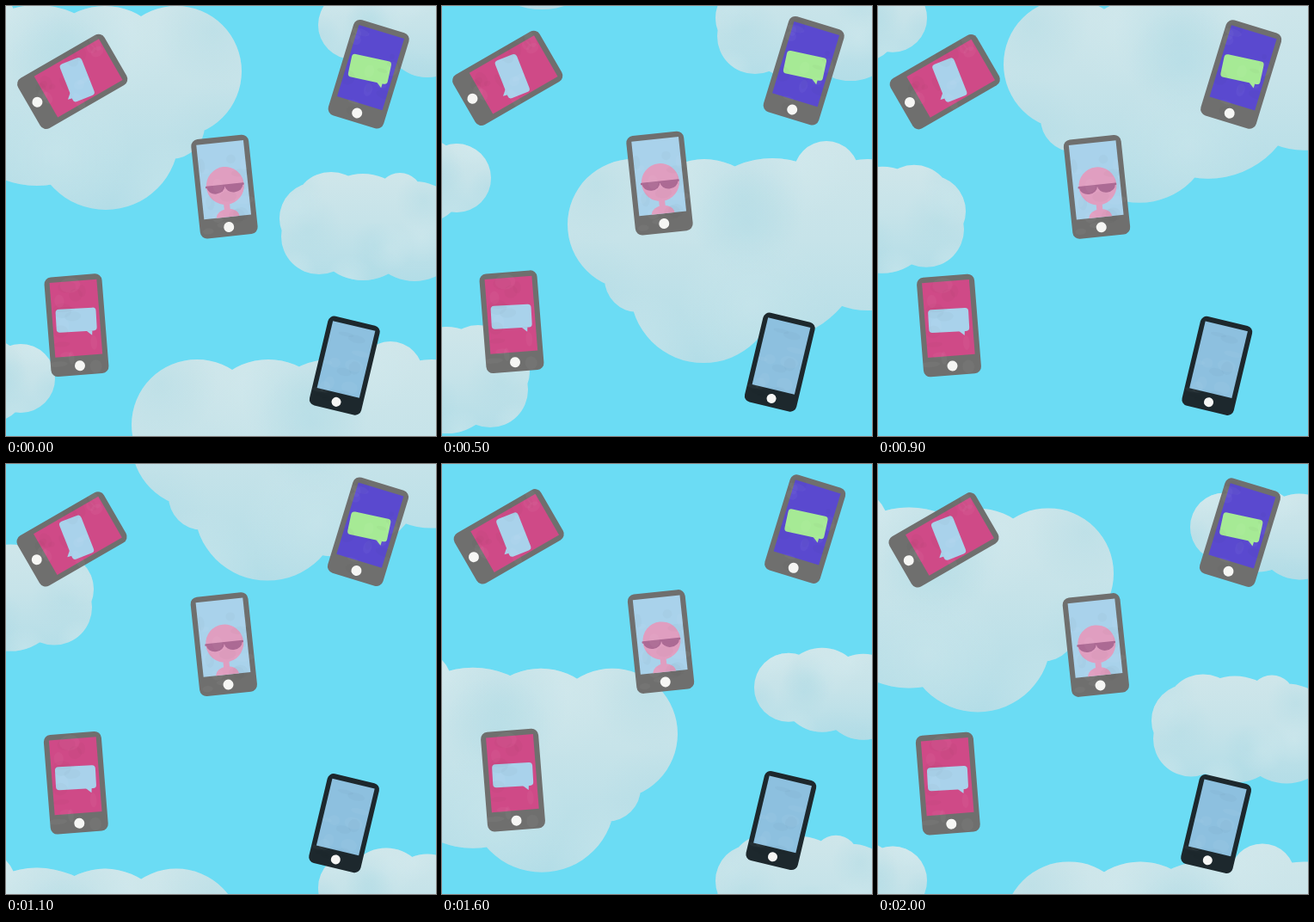
Animation, 500 px wide and 500 px high, one loop 2100 ms. Source, as an HTML page with a canvas:

```html
<!DOCTYPE html>
<html lang="en">
<head>
<meta charset="utf-8">
<title>Phones in the sky</title>
<style>
html, body { margin: 0; width: 100%; height: 100%; overflow: hidden; background: #6bdcf4; }
canvas { display: block; }
</style>
</head>
<body>
<canvas id="stage" width="500" height="500"></canvas>
<script>
const ctx = document.getElementById('stage').getContext('2d');
const STEP = 100, STEPS = 21;
const RISE = 46.58, PERIOD = 983, MIRROR_DROP = 411;
const TURN = 2 * Math.PI;

// Seeded random numbers: random(lo, hi)
function seeded(seed) {
  return (lo, hi) => {
    seed = (seed * 16807) % 2147483647;
    return lo + (hi - lo) * seed / 2147483647;
  };
}

// Each cloud is a union of a few circles: x, y, radius
const big = makeCloud([
  [222, 76, 76], [305, 80, 80], [384, 104, 105], [447, 17, 38],
  [495, 88, 88], [228, 139, 39], [304, 152, 85]
]);
const medium = makeCloud([
  [360, 247, 42], [378, 237, 44], [364, 268, 44],
  [415, 257, 62], [475, 262, 58], [458, 220, 26]
]);
const small = makeCloud([[403, 22, 40], [442, 25, 49], [490, 33, 50]]);

function makeCloud(circles) {
  const path = new Path2D();
  for (const [x, y, r] of circles) {
    path.moveTo(x + r, y);
    path.arc(x, y, r, 0, TURN);
  }
  const left = Math.min(...circles.map(([x, , r]) => x - r));
  const top = Math.min(...circles.map(([, y, r]) => y - r));
  const bottom = Math.max(...circles.map(([, y, r]) => y + r));
  const base = ctx.createLinearGradient(0, top, 0, bottom);
  base.addColorStop(0, '#cfe6ea');
  base.addColorStop(0.45, '#c6e3e9');
  base.addColorStop(1, '#b3dde7');

  // Soft light and dark patches, as in a wash of watercolour
  const random = seeded(circles.length * 1000 + 7);
  const fills = [base];
  for (let i = 0; i < 10; i++) {
    const x = random(left, 500), y = random(top, bottom), r = random(0.2, 0.35) * (bottom - top);
    const rgb = i % 2 ? '211,234,238' : '176,219,229';
    const patch = ctx.createRadialGradient(x, y, 0, x, y, r);
    patch.addColorStop(0, `rgba(${rgb},.45)`);
    patch.addColorStop(1, `rgba(${rgb},0)`);
    fills.push(patch);
  }
  return { path, fills };
}

function drawCloud(cloud, y, flip) {
  ctx.save();
  ctx.translate(flip ? 420 : 0, y);
  if (flip) ctx.scale(-1, 1);
  for (const fill of cloud.fills) {
    ctx.fillStyle = fill;
    ctx.fill(cloud.path);
  }
  ctx.restore();
}

// The group of clouds comes twice, the second time mirrored and lower
function drawSky(n) {
  ctx.fillStyle = '#6bdcf4';
  ctx.fillRect(0, 0, 500, 500);
  for (const wrap of [0, PERIOD]) {
    for (const side of [0, 1]) {
      const y = wrap + side * MIRROR_DROP - RISE * n;
      drawCloud(big, y, !side);
      drawCloud(medium, y, side);
      drawCloud(small, y, side);
    }
  }
}

const PINK = '#cf4a87', BLUE = '#a9d2eb';
const phones = [
  { x: 77, y: 86, turn: 60, screen: PINK, bubble: BLUE },
  { x: 421.5, y: 77.3, turn: 17, screen: '#5a49cf', bubble: '#a6ea95' },
  { x: 253.8, y: 208.2, turn: -6, screen: BLUE, face: true },
  { x: 81.8, y: 369.3, turn: -4.5, screen: PINK, bubble: BLUE },
  { x: 393.6, y: 416.2, turn: 13.4, size: 0.92, screen: '#8dc0df', body: '#1d282d' }
];

function box(x, y, w, h, r, color) {
  ctx.fillStyle = color;
  ctx.beginPath();
  ctx.roundRect(x, y, w, h, r);
  ctx.fill();
}

function disc(x, y, rx, ry, color, sweep = TURN) {
  ctx.fillStyle = color;
  ctx.beginPath();
  ctx.ellipse(x, y, rx, ry, 0, 0, sweep);
  ctx.fill();
}

function rotate(degrees) {
  ctx.rotate(degrees * TURN / 360);
}

// The bubble leans from the phone's angle towards the nearest right angle
function drawBubble(color, turn) {
  rotate(0.28 * (Math.round(turn / 90) * 90 - turn));
  box(-23.5, -19.5, 47, 27, 4, color);
  ctx.beginPath();
  ctx.moveTo(11, 7);
  ctx.lineTo(17.5, 12.5);
  ctx.lineTo(18, 7);
  ctx.fill();
}

function drawFace() {
  const skin = '#e09ec0', shade = '#ac6a94';
  disc(1, -1, 22, 22, skin);
  box(-3, 19, 7, 10, 2, skin);
  disc(0.5, 36, 13.5, 10, skin);
  box(-22, -2.5, 45, 2.5, 1, shade);
  for (const x of [-10, 11]) disc(x, -1, 10.5, 8.5, shade, TURN / 2);
}

// Faint paper grain, the same for a phone at every moment
function drawGrain(seed) {
  const random = seeded(seed);
  for (let i = 0; i < 16; i++) {
    const color = i % 2 ? 'rgba(255,255,255,.03)' : 'rgba(0,0,40,.02)';
    disc(random(-27, 27), random(-50, 50), random(3, 12), random(2, 9), color);
  }
}

// All phones bob twice and sway three times in one loop
function drawPhone(p, index, n) {
  const size = p.size || 1;
  const bob = 2.3 * Math.cos(2 * TURN * (n + 1) / STEPS);
  const sway = -0.8 * Math.cos(3 * TURN * (n - 5) / STEPS);
  ctx.save();
  ctx.translate(p.x + sway, p.y + bob);
  rotate(p.turn);
  ctx.scale(size, size);
  box(-33.6, -58, 67.2, 116, 8, p.body || '#6f6f6e');
  ctx.clip();
  box(-27.5, -51.5, 55, 87, 0, p.screen);
  ctx.save();
  ctx.clip();
  if (p.bubble) drawBubble(p.bubble, p.turn);
  if (p.face) drawFace();
  ctx.restore();
  drawGrain(index * 7919 + 4321);
  disc(0.3, 47.2, 6, 6, '#f6f6f4');
  ctx.restore();
}

function play(time) {
  const n = Math.floor(time / STEP) % STEPS;
  drawSky(n);
  phones.forEach((p, i) => drawPhone(p, i, n));
  requestAnimationFrame(play);
}
requestAnimationFrame(play);
</script>
</body>
</html>
```
